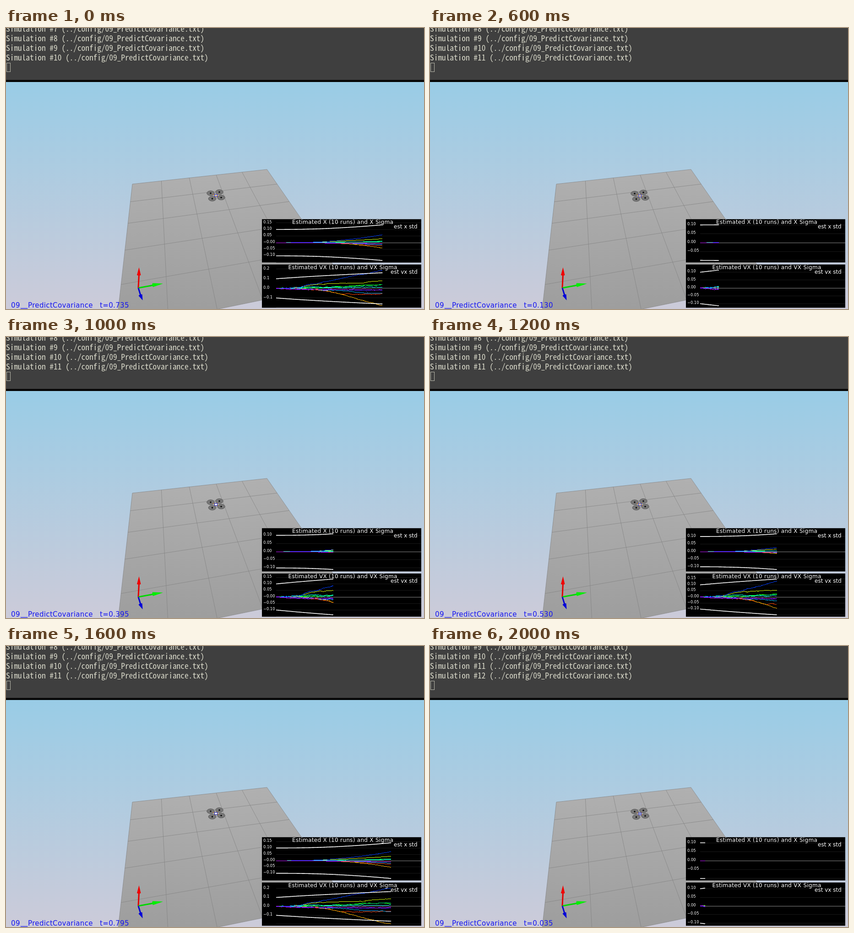
Animation of 913x614 px, one loop 2.1 s. Source, as an HTML page:

```html
<!DOCTYPE html>
<html lang="en">
<head>
<meta charset="utf-8">
<title>Predict covariance</title>
<style>
  html, body { margin: 0; width: 100%; height: 100%; overflow: hidden; background: #000; }
  svg { display: block; width: 913px; height: 614px; }
  text { white-space: pre; }
  .term { font: 17.333px "Noto Sans Mono CJK JP", "Noto Sans Mono CJK SC", "Noto Sans Mono CJK KR", monospace; fill: #dcdccc; }
  .plot text { font: 12px "DejaVu Sans", sans-serif; fill: #fff; }
  .plot .title { letter-spacing: .3px; }
  .plot .tick { font-size: 8.3px; }
  .plot path { fill: none; }
  .status { font: 15px "DejaVu Sans", sans-serif; letter-spacing: .35px; fill: #1414f0; }
  .status .bar { font-size: 30px; font-weight: 200; }
</style>
</head>
<body>
<svg viewBox="0 0 913 614">
  <defs>
    <linearGradient id="sky" x1="0" y1="0" x2="0" y2="1">
      <stop offset="0" stop-color="#99cce6"/><stop offset="1" stop-color="#cccbd9"/>
    </linearGradient>
    <linearGradient id="floor" x1="0" y1="0" x2="0" y2="1">
      <stop offset="0" stop-color="#b0b0b0"/><stop offset="1" stop-color="#9b9b9b"/>
    </linearGradient>
    <clipPath id="clipX"><rect x="559" y="417.500" width="348" height="95"/></clipPath>
    <clipPath id="clipV"><rect x="559" y="516.500" width="348" height="95"/></clipPath>
  </defs>

  <rect y="118" width="913" height="496" fill="url(#sky)"/>
  <path id="ground" fill="url(#floor)" stroke="#808080" stroke-width=".7"/>
  <path id="grid" fill="none" stroke="#808080" stroke-width=".7"/>

  <g id="drone">
    <g id="rotors" fill="#777" stroke="#585858"></g>
    <path d="M451 363L465 368.500M463 361.500L454 370" stroke="#d08030"/>
    <g id="hubs" fill="#0a0a0a"></g>
    <rect x="455.500" y="363.500" width="6" height="5" fill="#ddd" stroke="#2222b8"/>
    <rect id="spark" x="457" y="365" width="3" height="2"/>
  </g>

  <g stroke-width="3">
    <path d="M289 568L290.500 538" stroke="#e00000"/>
    <path d="M290.500 523L294.500 540Q290 542 286 540Z" fill="#f00000"/>
    <path d="M289 568L322 562" stroke="#00d800"/>
    <path d="M343 558.500L320 557.500Q318.500 562 321 566Z" fill="#00ee00"/>
    <path d="M289 568L294 584" stroke="#0000d0"/>
    <path d="M298.500 595L289.500 585Q292 581.500 297.500 582Z" fill="#0000d8"/>
  </g>

  <g class="status">
    <text x="11" y="611">09</text><text class="bar" x="32" y="606">_</text>
    <text x="48" y="611">PredictCovariance</text>
    <text id="clock" x="205" y="611"></text>
  </g>

  <g class="plot" id="plotX" clip-path="url(#clipX)"></g>
  <g class="plot" id="plotV" clip-path="url(#clipV)"></g>

  <rect width="913" height="114" fill="#3f3f3f"/>
  <rect y="113.500" width="913" height="4.500" fill="#050505"/>
  <g id="term" class="term"></g>
  <rect x="1.500" y="76.500" width="8" height="19" fill="none" stroke="#b8b8aa"/>
</svg>
<script>
const $ = id => document.getElementById(id);

function add(parent, tag, attrs, text = "") {
  const el = document.createElementNS("http://www.w3.org/2000/svg", tag);
  for (const key in attrs) el.setAttribute(key, attrs[key]);
  el.textContent = text;
  return parent.appendChild(el);
}

// Ground: the unit square seen in perspective.
const corners = [[276, 341], [570, 309], [742, 557], [240, 660]];
const depth = [1, 1.1, 0.6514, 0.5514];
function project(u, v) {
  const w = [(1 - u) * (1 - v), u * (1 - v), u * v, (1 - u) * v].map((b, i) => b * depth[i]);
  const sum = w.reduce((a, b) => a + b);
  return [0, 1].map(k => (w.reduce((a, b, i) => a + b * corners[i][k], 0) / sum).toFixed(1));
}
$("ground").setAttribute("d", "M" + corners.join("L") + "Z");
let grid = "";
for (let i = 1; i < 5; i++) {
  grid += `M${project(i / 5, 0)}L${project(i / 5, 1)}M${project(0, i / 5)}L${project(1, i / 5)}`;
}
$("grid").setAttribute("d", grid);

for (const [cx, cy] of [[447, 361], [466, 358.5], [450.5, 373], [470, 370.5]]) {
  add($("rotors"), "ellipse", { cx, cy, rx: 8.3, ry: 5.2 });
  add($("hubs"), "circle", { cx, cy, r: 1.7 });
}

// Velocity of each run at the knot times; position is its integral.
const knots = [0, 0.15, 0.3, 0.45, 0.6, 0.75, 0.95, 1.1];
const runs = [
  { hue: 15, v: [-0.003, -0.018, -0.058, -0.062, -0.058, -0.06] },
  { hue: 42, v: [0.005, -0.015, -0.065, -0.125, -0.188, -0.236] },
  { hue: 70, v: [0.012, 0.04, 0.052, 0.062, 0.078, 0.107] },
  { hue: 115, v: [0.006, 0.005, 0.022, 0.03, 0.035, 0.032] },
  { hue: 147, v: [0.004, 0.008, 0.018, 0.028, 0.04, 0.018] },
  { hue: 178, v: [0.008, 0.014, 0.004, 0.016, 0.012, 0.014] },
  { hue: 200, v: [-0.006, -0.015, -0.022, -0.045, -0.058, -0.078] },
  { hue: 226, v: [0.01, 0.058, 0.105, 0.145, 0.195, 0.229] },
  { hue: 255, v: [-0.012, -0.01, -0.018, -0.022, -0.02, -0.018] },
  { hue: 283, v: [-0.016, -0.012, -0.012, -0.014, -0.008, 0.014] }
];

let seed = 7;
const random = () => (seed = seed * 16807 % 2147483647) / 2147483647;

const DT = 0.005;
for (const run of runs) {
  const v = [0, ...run.v, run.v[5]];
  run.vs = [];
  run.xs = [];
  let noise = 0, x = 0;
  for (let i = 0; i <= 204; i++) {
    const t = i * DT;
    const k = knots.findIndex(knot => knot > t) - 1;
    const f = (t - knots[k]) / (knots[k + 1] - knots[k]);
    noise = noise * 0.88 + (random() - 0.5) * 0.0045;
    const now = v[k] + (v[k + 1] - v[k]) * f + noise;
    run.vs.push(now);
    run.xs.push(x += now * DT);
  }
  run.color = `hsl(${run.hue} 100% ${run.hue > 250 ? 55 : 50}%)`;
}

const sigmaV = t => Math.sqrt(0.01 + 0.0222 * t);
const sigmaX = t => Math.sqrt(0.01 + 0.01 * t * t + 0.0074 * t ** 3);

function makePlot(id, top, title, titleX, legend, legendX, key, sigma) {
  const g = $(id);
  add(g, "rect", { x: 559, y: top - 0.5, width: 348, height: 95 });
  const ticks = add(g, "g", {});
  const lines = runs.map(run => add(g, "path", { stroke: run.color, "shape-rendering": "crispEdges" }));
  const bounds = [1, -1].map(() => add(g, "path", { stroke: "#fff", "stroke-width": 1.6 }));
  add(g, "text", { class: "title", x: titleX, y: top + 10 }, title);
  add(g, "text", { x: legendX, y: top + 20 }, legend);

  return t => {
    const n = Math.round(t / DT) + 1;
    const times = Array.from({ length: n }, (_, i) => i * DT);
    const band = times.map(sigma);
    const all = runs.flatMap(run => run[key].slice(0, n)).concat(band, band.map(s => -s));
    const max = Math.max(...all), min = Math.min(...all);
    const scale = 78 / (max - min);
    const toY = value => top + 12 + (max - value) * scale;
    const path = values => "M" + values.map((value, i) =>
      (590 + 316 * times[i]).toFixed(1) + " " + toY(value).toFixed(1)).join("L");

    lines.forEach((line, i) => line.setAttribute("d", path(runs[i][key].slice(0, n))));
    bounds[0].setAttribute("d", path(band));
    bounds[1].setAttribute("d", path(band.map(s => -s)));

    ticks.textContent = "";
    const step = max - min > 0.33 ? 0.1 : 0.05;
    const lowest = Math.ceil(-43.5 / scale / step);
    for (let k = lowest; k <= 6; k++) {
      const y = toY(k * step);
      if (y < top + 2) break;
      add(ticks, "path", { d: `M590 ${Math.floor(y) + 0.5}H907`, stroke: k ? "#191919" : "#898989" });
      if (y > top + 89.4) continue;
      const negative = k < 0 || (k === 0 && lowest === -3);
      const label = (negative ? "\u2212" : "") + Math.abs(k * step).toFixed(step < 0.1 ? 2 : 1);
      add(ticks, "text", { class: "tick", x: 562, y: y + 0.7 }, label);
    }
  };
}

const plots = [
  makePlot("plotX", 418, "Estimated X (10 runs) and X Sigma", 625, "est x std", 847, "xs", sigmaX),
  makePlot("plotV", 517, "Estimated VX (10 runs) and VX Sigma", 616.5, "est vx std", 840, "vs", sigmaV)
];

const rows = [8.4, 29.2, 50, 70.8].map(y => add($("term"), "text", { x: 0, y }));

// Simulated time at each 100 ms tick.
const clock = [0.735, 0.8, 0.87, 0.94, 1.005, 0.065, 0.13, 0.195, 0.265, 0.33, 0.395,
  0.465, 0.53, 0.6, 0.665, 0.73, 0.795, 0.86, 0.925, 0.99, 0.035];
const sparks = ["#e0a020", "#fff", "#4060d0"];

function show(tick) {
  const t = clock[tick];
  const sim = tick < 5 ? 10 : tick < 20 ? 11 : 12;
  rows.forEach((row, i) => {
    row.textContent = `Simulation #${sim - 3 + i} (../config/09_PredictCovariance.txt)`;
  });
  $("clock").textContent = "t=" + t.toFixed(3);
  $("drone").setAttribute("transform", `translate(0 ${t < 0.2 ? 0.7 : 0})`);
  $("spark").setAttribute("fill", sparks[tick % 3]);
  plots.forEach(plot => plot(t));
}

const start = performance.now();
let shown = -1;
function loop() {
  const tick = Math.floor((performance.now() - start) % 2100 / 100);
  if (tick !== shown) show(shown = tick);
  requestAnimationFrame(loop);
}
loop();
</script>
</body>
</html>
```
